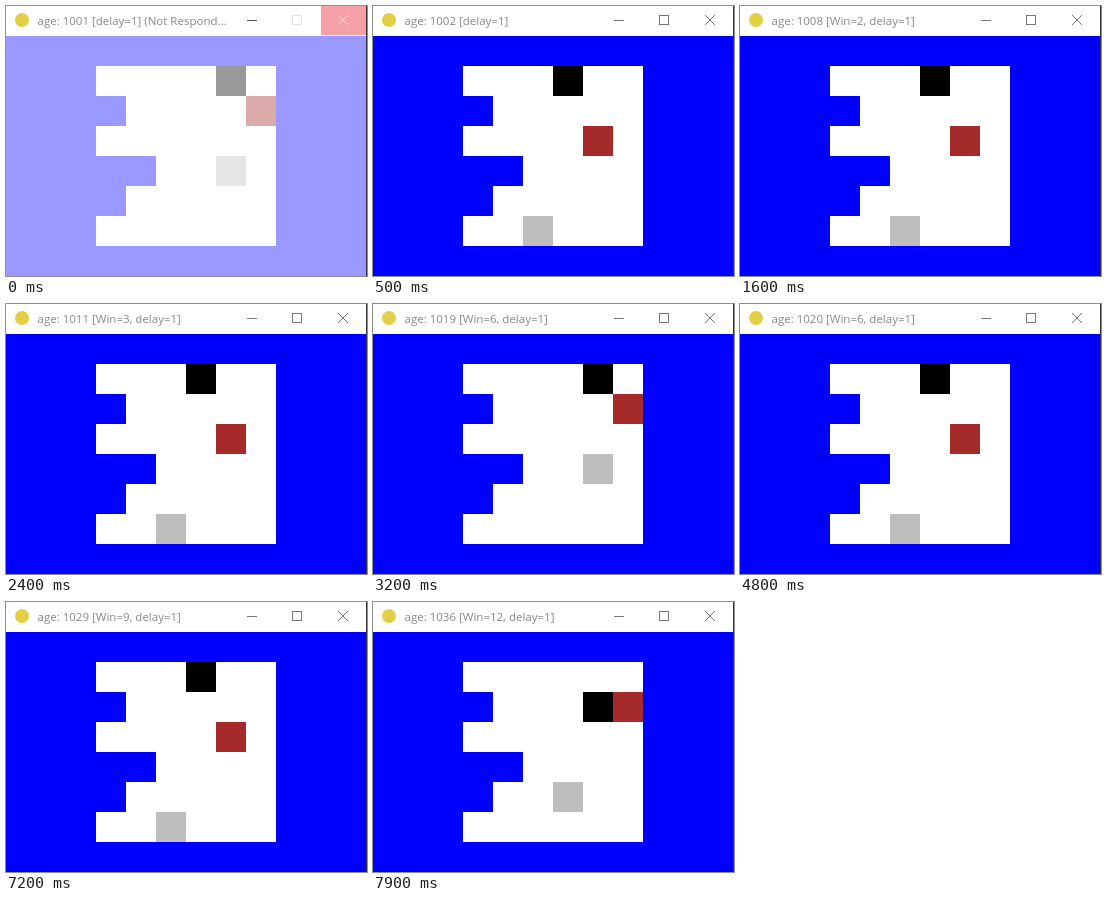
An HTML page with a canvas for the animation above (8 s loop, 361x270 px).

```html
<!DOCTYPE html>
<html lang="en">
<head>
<meta charset="utf-8">
<title>Grid world</title>
<style>
html, body { margin: 0; width: 100%; height: 100%; overflow: hidden; background: #fff; }
canvas { display: block; }
</style>
</head>
<body>
<canvas id="stage" width="361" height="270"></canvas>
<script>
const ctx = document.getElementById("stage").getContext("2d");
const LOOP = 8000, STEP = 100, CELL = 30, TITLE_HEIGHT = 30, FROZEN_UNTIL = 500;

// The simulation runs in bursts: start time, first age, number of steps
const bursts = [
  [0, 1001, 1], [500, 1002, 3], [1300, 1005, 4], [2200, 1009, 3], [2600, 1013, 7],
  [4800, 1020, 2], [5100, 1022, 2], [5900, 1024, 5], [7200, 1029, 2], [7500, 1032, 5]
];

// First open column of each board row; every row is open up to column 9
const openFrom = [3, 4, 3, 5, 4, 3];

// Agents repeat a three-step cycle of [column, row]
const agents = [
  { color: "#000", path: [[6, 1], [7, 2], [7, 1]] },
  { color: "#a52a2a", path: [[7, 3], [8, 2], [8, 2]] },
  { color: "#bebebe", path: [[5, 6], [6, 5], [7, 4]] }
];

function ageAt(time) {
  const [start, first, count] = bursts.filter(burst => burst[0] <= time).pop();
  return first + Math.min(count - 1, Math.floor((time - start) / STEP));
}

function rect(color, x, y, width, height) {
  ctx.fillStyle = color;
  ctx.fillRect(x, y, width, height);
}

function cells(color, column, row, span = 1) {
  rect(color, column * CELL, TITLE_HEIGHT + row * CELL, span * CELL, CELL);
}

function line(x1, y1, x2, y2) {
  ctx.beginPath();
  ctx.moveTo(x1, y1);
  ctx.lineTo(x2, y2);
  ctx.stroke();
}

function drawTitleBar(age, frozen) {
  rect("#fff", 0, 0, 361, TITLE_HEIGHT);
  ctx.fillStyle = "#e3cf45";
  ctx.beginPath();
  ctx.arc(16, 14, 7, 0, Math.PI * 2);
  ctx.fill();

  const wins = Math.floor((age - 1000) / 3);
  const info = (wins ? `Win=${wins}, ` : "") + "delay=1";
  ctx.font = '11.5px "Open Sans", sans-serif';
  ctx.fillStyle = "#888";
  ctx.fillText(`age: ${age} [${info}]` + (frozen ? " (Not Respond..." : ""), 31.5, 19);

  if (frozen) rect("#f6a0a7", 315, 0, 45, 29);
  ctx.lineWidth = 1;
  ctx.strokeStyle = frozen ? "#555" : "#777";
  line(241, 14.5, 251, 14.5);
  ctx.strokeStyle = frozen ? "#e2e2e2" : "#777";
  ctx.strokeRect(286.5, 9.5, 9, 9);
  ctx.strokeStyle = frozen ? "#fbd5d8" : "#777";
  line(332, 9, 342, 19);
  line(342, 9, 332, 19);
}

function drawBoard(age, frozen) {
  rect("#00f", 0, TITLE_HEIGHT, 361, 240);
  openFrom.forEach((column, i) => cells("#fff", column, i + 1, 9 - column));
  for (const { color, path } of agents) cells(color, ...path[age % 3]);
  if (frozen) rect("rgba(255, 255, 255, 0.6)", 0, TITLE_HEIGHT, 361, 240);
}

function draw() {
  const time = performance.now() % LOOP;
  const age = ageAt(time), frozen = time < FROZEN_UNTIL;
  drawTitleBar(age, frozen);
  drawBoard(age, frozen);
  rect("#333", 360, 0, 1, 270);
  requestAnimationFrame(draw);
}

draw();
</script>
</body>
</html>
```
